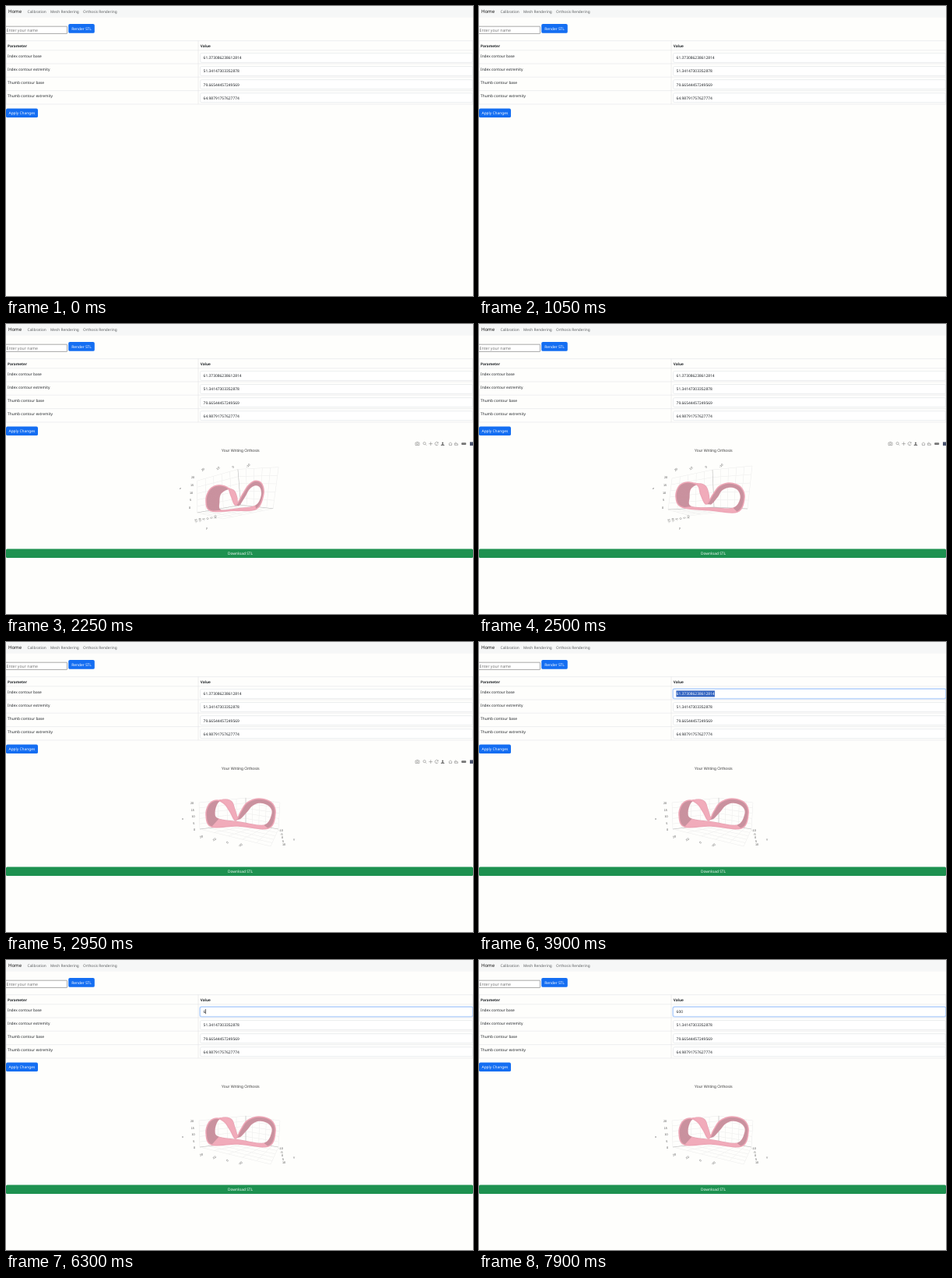
These frames come from a looping animation (600x372 px, 8 s). An HTML page with a canvas:

```html
<!DOCTYPE html>
<html lang="en">
<head>
<meta charset="utf-8">
<title>Orthosis Rendering</title>
<style>
  html, body { margin: 0; width: 100%; height: 100%; overflow: hidden; background: #fefefc; }
  canvas, svg { position: absolute; left: 0; top: 0; width: 600px; height: 372px; display: block; }
  text { font: 4.82px "Noto Sans", sans-serif; fill: #212529; text-rendering: geometricPrecision; white-space: pre; }
  .bold { font-weight: 700; font-size: 4.72px; }
  .brand { font-size: 6px; fill: #111; }
  .nav { font-size: 4.78px; fill: #5c5f61; }
  .hint { font-size: 5.15px; fill: #757575; }
  .white { fill: #fff; text-anchor: middle; }
  .num { font-size: 4.93px; }
  .title { font: 5.2px "Liberation Sans", sans-serif; fill: #444; text-anchor: middle; }
  .tick { font: 3.8px "Liberation Sans", sans-serif; fill: #555; text-anchor: middle; }
</style>
</head>
<body>
<canvas id="plot"></canvas>
<svg id="page" viewBox="0 0 600 372"></svg>
<script>
const LOOP = 8000, STEP = 50;
const page = document.getElementById('page');
const canvas = document.getElementById('plot');
const ctx = canvas.getContext('2d');
const ratio = Math.max(2, window.devicePixelRatio || 1);
canvas.width = 600 * ratio;
canvas.height = 372 * ratio;

function add(tag, attrs, parent = page) {
  const node = document.createElementNS('http://www.w3.org/2000/svg', tag);
  for (const key in attrs) node.setAttribute(key, attrs[key]);
  parent.appendChild(node);
  return node;
}
function label(x, y, string, cls = '', parent = page) {
  const node = add('text', { x, y, class: cls }, parent);
  node.textContent = string;
  return node;
}
const box = (x, y, width, height, fill, rx = 0, more = {}, parent = page) =>
  add('rect', { x, y, width, height, fill, rx, ...more }, parent);
const show = (node, on) => node.setAttribute('opacity', +on);

// Navigation, name form
box(0, 0, 600, 14.6, '#f6f7f7');
label(3, 9.1, 'Home', 'brand');
label(27.4, 8.7, 'Calibration', 'nav');
label(57, 8.7, 'Mesh Rendering', 'nav');
label(99, 8.7, 'Orthosis Rendering', 'nav');
box(-0.5, 26.2, 79, 9.2, '#fff', 0.4, { stroke: '#858585', 'stroke-width': 0.7 });
label(0.6, 32.6, 'Enter your name', 'hint');
box(80.2, 23.1, 33.6, 11.7, '#146ef2', 1.9);
label(97, 30.7, 'Render STL', 'white');

// Parameter table
const LINE = { stroke: '#dcdfe2', 'stroke-width': 0.5 };
for (const y of [44.6, 56.8, 74, 91.2, 108.6, 126])
  add('line', { x1: 0, x2: 600, y1: y, y2: y, ...LINE });
for (const x of [0.2, 247, 599.8])
  add('line', { x1: x, x2: x, y1: 44.6, y2: 126, ...LINE });
label(2, 53.1, 'Parameter', 'bold');
label(249.8, 53.1, 'Value', 'bold');
const rows = [
  ['Index contour base', '61.373086238612814'],
  ['Index contour extremity', '51.34147303352878'],
  ['Thumb contour base', '79.66544457249569'],
  ['Thumb contour extremity', '64.98791757627774'],
];
const fields = rows.map(([name, value], i) => {
  const y = 60.4 + i * 17.1;
  label(2, y + 5.6, name);
  const glow = i ? null : box(248.9, y - 0.6, 351, 13.2, 'none', 2.4,
    { stroke: '#bcd6fd', 'stroke-width': 1.2, opacity: 0 });
  const frame = box(249.6, y, 350, 12, '#fff', 1.9, { stroke: '#d9dce0', 'stroke-width': 0.5 });
  const mark = i ? null : box(253.4, 62.4, 49.5, 8, '#3163c0', 0, { opacity: 0 });
  return { glow, frame, mark, text: label(253.6, y + 7.9, value, 'num') };
});
const caret = box(256.4, 63, 0.6, 6.2, '#111');
box(0, 131.5, 41, 11.6, '#146ef2', 1.9);
label(20.4, 139.1, 'Apply Changes', 'white');

// Result area
const result = add('g', {});
label(301.2, 163.8, 'Your Writing Orthosis', 'title', result);
box(0, 288.5, 600, 11.5, '#1d9150', 1.5, {}, result);
label(301, 296.1, 'Download STL', 'white', result);

// Toolbar icons: [x, path around 0,0, strength]
const toolbar = add('g', {}, result);
const icons = [
  [528.5, 'M-2.5-1.5h1.2l.6-.8h1.4l.6.8h1.2v3.4h-5zM-1 0a1 1 0 1 0 2 0a1 1 0 1 0-2 0', 0.4],
  [538, 'M-2-.5a1.6 1.6 0 1 0 3.2 0a1.6 1.6 0 1 0-3.2 0M.8.7L2.3 2.2', 0.4],
  [545.7, 'M-2.4 0h4.8M0-2.4v4.8', 0.4],
  [553.2, 'M1.9-1.2a2.2 2.2 0 1 0 .2 2M2-2.2v1.4h-1.4M-.8.5h1.2', 0.4],
  [561, 'M0-2.2v3.2M-1-1h2M-2 2l1-1.2h2l1 1.2z', 0.75],
  [571, 'M-2.3.2L0-1.8L2.3.2M-1.5 0v2h3v-2', 0.4],
  [578.3, 'M-2.3 0L-.4-1.8L1.2-.2M-1.8 0v1.8h4v-1.6z', 0.4],
  [588.2, 'M-2.5-.9h5v1.8h-5zM-2.3 0h4.6', 0.8],
];
for (const [x, d, opacity] of icons)
  add('path', { d, transform: `translate(${x} 153.6)`, fill: 'none', stroke: '#444', 'stroke-width': 0.9, opacity }, toolbar);
box(596, 151.4, 4, 4.6, '#4a5470', 0, {}, toolbar);

// Each view holds both rims of the band, three grid walls, tick rows and axis names.
const views = [
  {
    near: [270,257, 272,243, 279,230, 288,222, 298,221, 305,226, 307,237, 317,217, 321,203, 314,191, 301,190, 292,203, 282,223, 275,240],
    far: [290,256, 288,250, 290,243, 295,238, 299,235, 302,236, 304,240, 309,220, 314,206, 310,198, 304,198, 299,208, 296,222, 288,240],
    walls: [237,213, 290,184, 300,222, 256,257, 290,184, 347,190, 336,236, 300,222, 256,257, 300,222, 336,236, 310,265],
    ticks: [
      [233,219, 245,246, '20 15 10 5 0', 25],
      [246,244, 256,261, '-15 -10 -5 0 5 10', 45],
      [341,241, 325,257, '-20 -10 0', 40],
    ],
    names: [['z', 224, 240], ['x', 336, 263]],
  },
  {
    near: [261,235, 253,222, 257,208, 268,203, 281,207, 285,219, 292,231, 301,218, 309,208, 322,204, 336,209, 341,223, 332,241, 298,239],
    far: [272,234, 270,222, 272,211, 282,205, 291,208, 295,218, 297,231, 306,222, 312,213, 323,209, 333,213, 336,224, 327,236, 300,236],
    walls: [248,198, 300,187, 302,235, 243,238, 300,187, 351,182, 345,237, 302,235, 243,238, 302,235, 345,237, 270,246],
    ticks: [
      [240,198, 236,237, '20 15 10 5 0', 0],
      [253,188, 311,183, '20 10 0 -10', -40],
      [244,254, 269,249, '-15 -10 -5 0 5 10', -85],
    ],
    names: [['z', 224, 212], ['y', 258, 263]],
  },
  {
    near: [264,237, 257,222, 261,208, 271,203, 281,208, 288,218, 295,229, 302,217, 310,206, 325,201, 341,206, 346,220, 337,239, 298,236],
    far: [273,227, 268,219, 272,206, 281,202, 290,205, 294,215, 299,227, 309,218, 316,210, 326,206, 338,210, 342,220, 332,235, 300,231],
    walls: [248,206, 308,200, 308,233, 249,240, 308,200, 352,206, 350,240, 308,233, 249,240, 308,233, 350,240, 340,262],
    ticks: [
      [239,208, 242,242, '20 15 10 5 0', 0],
      [251,251, 301,262, '20 10 0 -10', -25],
      [353,243, 357,261, '-10 -5 0 5 10', 0],
    ],
    names: [['x', 227, 228], ['Y', 370, 255]],
  },
];
const tickGroups = views.map(({ ticks, names }) => {
  const group = add('g', {}, result);
  for (const [x1, y1, x2, y2, words, angle] of ticks) {
    const list = words.split(' ');
    list.forEach((word, i) => {
      const u = i / (list.length - 1), x = x1 + (x2 - x1) * u, y = y1 + (y2 - y1) * u;
      label(x, y, word, 'tick', group).setAttribute('transform', `rotate(${angle} ${x} ${y - 1.3})`);
    });
  }
  for (const [name, x, y] of names) label(x, y, name, 'tick', group);
  return group;
});

const clamp = v => Math.min(1, Math.max(0, v));
const span = (t, from, to) => clamp((t - from) / (to - from));
const ease = u => u * u * (3 - 2 * u);
const blend = (a, b, u) => a.map((v, i) => v + (b[i] - v) * u);
const pairs = list => Array.from({ length: list.length / 2 }, (_, i) => [list[2 * i], list[2 * i + 1]]);

const SUB = 8;
function smoothLoop(points) {
  const n = points.length, out = [];
  for (let i = 0; i < n; i++) {
    const [a, b, c, d] = [-1, 0, 1, 2].map(k => points[(i + k + n) % n]);
    for (let s = 0; s < SUB; s++) {
      const u = s / SUB;
      out.push([0, 1].map(k => b[k] + u / 2 * (c[k] - a[k]
        + u * (2 * a[k] - 5 * b[k] + 4 * c[k] - d[k] + u * (3 * (b[k] - c[k]) + d[k] - a[k])))));
    }
  }
  return out;
}
function trace(points, close) {
  ctx.beginPath();
  points.forEach(([x, y]) => ctx.lineTo(x, y));
  if (close) ctx.closePath();
}
function stroke(points, color, width, close) {
  trace(points, close);
  ctx.strokeStyle = color;
  ctx.lineWidth = width;
  ctx.stroke();
}
function drawWalls(list) {
  const corners = pairs(list);
  for (let w = 0; w < 3; w++) {
    const [a, b, c, d] = corners.slice(w * 4, w * 4 + 4);
    for (let i = 0; i <= 5; i++) {
      const u = i / 5;
      stroke([blend(a, b, u), blend(d, c, u)], '#ececeb', 0.5);
      stroke([blend(a, d, u), blend(b, c, u)], '#ececeb', 0.5);
    }
  }
  for (const i of [1, 3, 6]) stroke([corners[2], corners[i]], '#b4b4b4', 0.5);
}
function drawBand(nearList, farList) {
  const near = smoothLoop(pairs(nearList)), far = smoothLoop(pairs(farList));
  const n = near.length, floor = 12 * SUB;
  ctx.lineJoin = 'round';
  stroke(far, '#dc9cab', 1.3, true);
  for (let k = 0; k < n; k++) {
    const i = (k + floor) % n, j = (i + 1) % n;
    const [a, b, c] = [near[i], near[j], far[i]];
    const inside = (b[0] - a[0]) * (c[1] - a[1]) - (b[1] - a[1]) * (c[0] - a[0]) > 0;
    const color = inside && i < floor ? '#c9919e' : '#f1abba';
    trace([a, b, far[j], c], true);
    ctx.fillStyle = color;
    ctx.fill();
    ctx.strokeStyle = color;
    ctx.lineWidth = 0.5;
    ctx.stroke();
  }
  stroke(near, '#eda6b6', 1.5, true);
}
function drawPlot(t) {
  ctx.setTransform(ratio, 0, 0, ratio, 0, 0);
  ctx.clearRect(0, 0, 600, 372);
  if (t < 1650) return;
  const turn = ease(span(t, 1650, 2500)) + ease(span(t, 2500, 2950));
  const index = Math.min(1, Math.floor(turn)), u = turn - index;
  const part = key => blend(views[index][key], views[index + 1][key], u);
  drawWalls(part('walls'));
  drawBand(part('near'), part('far'));
  tickGroups.forEach((group, i) => show(group, i === Math.round(turn)));
}

function typed(t) {
  if (t < 5100) return rows[0][1];
  return t < 7200 ? '6' : t < 7250 ? '60' : '600';
}
function drawField(t) {
  const { glow, frame, mark, text } = fields[0];
  const focus = span(t, 3700, 3900), selected = t >= 3850 && t < 5100;
  const value = typed(t);
  show(glow, focus);
  frame.setAttribute('stroke', focus ? '#86b4f8' : '#d9dce0');
  show(mark, selected);
  text.style.fill = selected ? '#fff' : '';
  if (text.textContent !== value) text.textContent = value;
  const since = t - (t < 7200 ? 5100 : t < 7250 ? 7200 : 7250);
  show(caret, t >= 5100 && Math.floor(since / 600) % 2 === 0);
  caret.setAttribute('x', 253.6 + value.length * 2.82);
}

let drawn = -1;
const start = performance.now();
function render() {
  const t = Math.floor((performance.now() - start) % LOOP / STEP) * STEP;
  if (t !== drawn) {
    drawn = t;
    show(result, t >= 1650);
    toolbar.setAttribute('opacity', 0.1 + 0.9 * span(t, 1650, 1950) - span(t, 3250, 3550));
    drawPlot(t);
    drawField(t);
  }
  requestAnimationFrame(render);
}
render();
</script>
</body>
</html>
```
